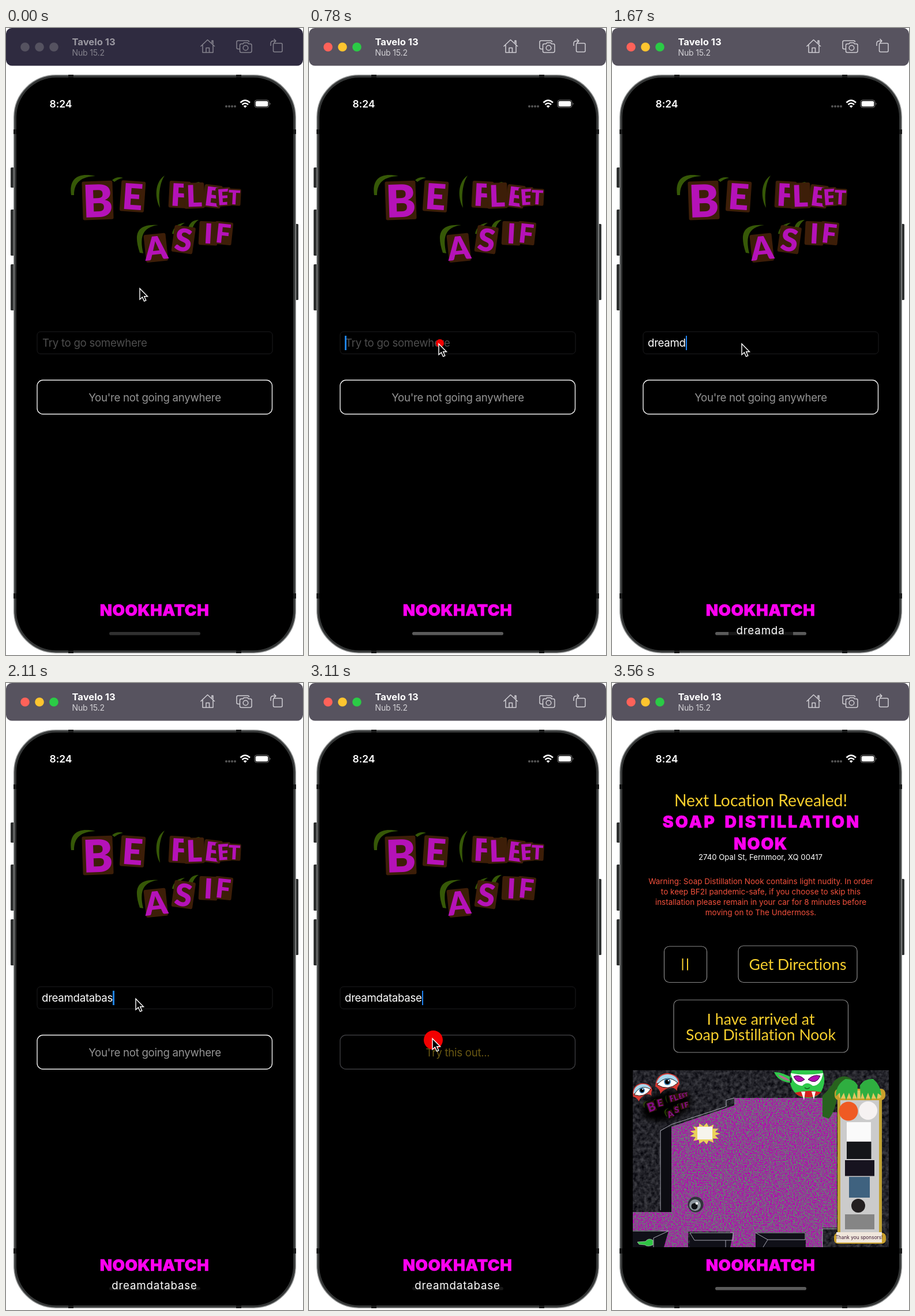
An HTML page for the animation above (4830 ms loop, 515x1088 px).

```html
<!DOCTYPE html>
<html lang="en">
<head>
<meta charset="utf-8">
<title>Phone simulator</title>
<style>
  html, body { margin: 0; width: 100%; height: 100%; overflow: hidden; background: #fff; }
  #stage { position: absolute; left: 0; top: 0; width: 515px; height: 1088px; overflow: hidden; font-family: Inter, sans-serif; }
  svg { position: absolute; left: 0; top: 0; display: block; }
  text { font-family: Inter, sans-serif; font-variant-ligatures: none; }
  .mid { text-anchor: middle; }
  .bar { fill: #2f2b40; }
  .light { fill: #555260; }
  .name { fill: #9a98a1; font-weight: 700; font-size: 16.6px; }
  .sys { fill: #85838d; font-size: 14px; letter-spacing: -.15px; }
  .icons { stroke: #85838d; fill: none; stroke-width: 1.5; stroke-linejoin: round; }
  .home { fill: #303030; }
  .active .bar { fill: #57535f; }
  .active .r { fill: #fe6259; }
  .active .y { fill: #fdc52f; }
  .active .g { fill: #2bcb46; }
  .active .name { fill: #fff; }
  .active .sys { fill: #d3d2d6; }
  .active .icons { stroke: #d0ced4; }
  .active .home { fill: #5a5a5a; }
  .deco { font-weight: 900; fill: #ff00f0; stroke: #ff00f0; stroke-width: .5; text-anchor: middle; }
  .gold { font-family: Lato, sans-serif; font-size: 26.6px; fill: #f7cf2d; text-anchor: middle; }
  .warn { font-size: 13.5px; fill: #f2503c; text-anchor: middle; }
  .box { fill: none; stroke: #8a8a8a; stroke-width: 1.2; }
  .ui, #field, #hint { font-size: 18.7px; letter-spacing: -.3px; }
  .tile { fill: #3d1e08; }
  .letter { font-family: Lato, sans-serif; font-weight: 900; fill: #b512b8; text-anchor: middle; }
  .arc { fill: #365807; }
  #hint, #field { position: absolute; left: 62px; top: 527px; height: 39px; line-height: 39px; white-space: pre; }
  #hint { left: 63px; color: #4d4d4d; }
  #field { color: #fff; display: flex; align-items: center; }
  #caret { width: 2.5px; height: 25px; background: #1f82f0; }
  #keys { position: absolute; left: 257.5px; top: 1031px; line-height: 30px; padding: 0 14px; transform: translateX(-50%);
    border-radius: 6px; background: rgba(0,0,0,.75); color: #fff; font-size: 18.7px; letter-spacing: .85px; white-space: pre; }
</style>
</head>
<body>
<div id="stage">
<svg id="scene" width="515" height="1088" viewBox="0 0 515 1088">
  <defs>
    <filter id="speckle" x="0" y="0" width="1" height="1" color-interpolation-filters="sRGB">
      <feTurbulence type="fractalNoise" baseFrequency=".4 .8" numOctaves="3" seed="4"/>
      <feColorMatrix values="0 0 0 0 .72  0 0 0 0 0  0 0 0 0 .7  40 0 0 0 -20.4" result="spots"/>
      <feComposite in="spots" in2="SourceGraphic" operator="in" result="cut"/>
      <feMerge><feMergeNode in="SourceGraphic"/><feMergeNode in="cut"/></feMerge>
    </filter>
    <filter id="rock" x="0" y="0" width="1" height="1" color-interpolation-filters="sRGB">
      <feTurbulence type="fractalNoise" baseFrequency=".16" numOctaves="5" seed="9"/>
      <feColorMatrix values=".34 0 0 0 -.03  .34 0 0 0 -.03  .34 0 0 0 -.005  0 0 0 0 1"/>
    </filter>
    <filter id="soft" x="-.3" y="-.3" width="1.600" height="1.600"><feGaussianBlur stdDeviation="5"/></filter>
    <clipPath id="mapClip"><rect x="36" y="672" width="444" height="307"/></clipPath>
    <g id="title">
      <path class="arc" d="M113 290C109 262 124 250 155 257C130 258 118 268 118 290zM275 256C257 268 258 296 267 312C264 292 266 270 275 256zM232 390C222 360 224 339 264 342C237 345 231 362 238 391zM184 264Q192 257 203 260Q194 262 188 267zM288 357Q291 340 310 338Q299 344 294 358zM316 347Q320 333 334 333Q326 338 323 349zM328 270Q334 264 340 271Q334 270 332 276z"/>
    </g>
  </defs>

  <!-- window bar -->
  <rect class="bar" width="515" height="65.5" rx="10"/>
  <circle class="light r" cx="33" cy="33" r="7.8"/>
  <circle class="light y" cx="58" cy="33" r="7.8"/>
  <circle class="light g" cx="83" cy="33" r="7.8"/>
  <text class="name" x="114.5" y="30">Tavelo 13</text>
  <text class="sys" x="114.5" y="48">Nub 15.2</text>
  <g class="icons">
    <path d="M337.5 32L349.500 20.500L362 32M341 29.500V42.500H359V29.500M357 26V22H359V28M347 42V34.500H352.500V42"/>
    <path d="M405 36.500H402.500Q400 36.500 400 34V24.500Q400 22 402.500 22H419Q421.500 22 421.500 24.500"/>
    <path d="M408 27.500H411L412.500 25.500H419L420.500 27.500H423.500Q426 27.500 426 30V39.500Q426 42.500 423.500 42.500H408Q405.500 42.500 405.500 40V30Q405.500 27.500 408 27.500z"/>
    <circle cx="415.500" cy="34.500" r="4.300"/>
    <rect x="463.500" y="26.500" width="15.500" height="15" rx="2"/>
    <path d="M459 31V27Q459 22.500 463.500 22.500H467M464.500 19L468 22.500L464.500 26"/>
  </g>

  <!-- phone body -->
  <g fill="#2e3030">
    <rect x="8" y="242" width="8" height="35" rx="1.500"/>
    <rect x="8" y="315" width="8" height="80" rx="1.500"/>
    <rect x="8" y="410" width="8" height="80" rx="1.500"/>
    <rect x="500" y="340" width="7" height="132" rx="1.500"/>
  </g>
  <rect x="13.800" y="81.800" width="488.400" height="1002.400" rx="73" fill="#343636" stroke="#8c8e8e" stroke-width="1.500"/>
  <g fill="#171818">
    <rect x="108" y="81" width="9" height="6"/><rect x="399" y="81" width="9" height="6"/>
    <rect x="108" y="1079" width="9" height="6"/><rect x="399" y="1079" width="9" height="6"/>
    <rect x="13" y="176" width="6" height="8"/><rect x="497" y="176" width="6" height="8"/>
    <rect x="13" y="981" width="6" height="9"/><rect x="497" y="981" width="6" height="9"/>
  </g>
  <rect x="18" y="86" width="480" height="994" rx="69"/>

  <!-- status line -->
  <text x="95" y="138" class="mid" font-size="17.500" font-weight="600" fill="#fff">8:24</text>
  <g fill="#555"><circle cx="382" cy="136" r="2"/><circle cx="387" cy="136" r="2"/><circle cx="392" cy="136" r="2"/><circle cx="397" cy="136" r="2"/></g>
  <g fill="none" stroke="#fff" stroke-width="2.600"><path d="M406.500 129.500Q414.500 121.500 423 129.500M409.500 133Q414.500 128 420 133"/></g>
  <path d="M414.700 138.500L411.700 135.500Q414.700 133 417.700 135.500z" fill="#fff"/>
  <rect x="431" y="125" width="25" height="13" rx="4" fill="none" stroke="#777"/>
  <rect x="432.700" y="126.700" width="21.600" height="9.600" rx="2.500" fill="#fff"/>
  <path d="M457.500 129.500Q460 131.500 457.500 133.500z" fill="#777"/>

  <!-- search page -->
  <g id="search">
    <use href="#title"/>
    <rect x="54" y="527" width="408" height="38.500" rx="6" fill="none" stroke="#1c1c1e"/>
    <g id="button">
      <rect id="frame" x="54" y="611" width="407.500" height="59" rx="10" fill="none" stroke-width="1.400"/>
      <text id="label" class="ui mid" x="258" y="647.500"></text>
    </g>
  </g>

  <!-- location page -->
  <g id="place">
    <text class="gold" x="258" y="214" style="font-size:28.300px">Next Location Revealed!</text>
    <text class="deco" x="259.500" y="251" font-size="28.500" letter-spacing="3" word-spacing="6">SOAP DISTILLATION</text>
    <text class="deco" x="258" y="289" font-size="28.500" letter-spacing="1.500">NOOK</text>
    <text class="mid" x="257.500" y="307" font-size="13.200" fill="#fff">2740 Opal St, Fernmoor, XQ 00417</text>
    <text class="warn" x="258" y="349">Warning: Soap Distillation Nook contains light nudity. In order</text>
    <text class="warn" x="258" y="367">to keep BF2I pandemic-safe, if you choose to skip this</text>
    <text class="warn" x="258" y="385">installation please remain in your car for 8 minutes before</text>
    <text class="warn" x="258" y="403">moving on to The Undermoss.</text>
    <rect class="box" x="90.500" y="457" width="74" height="62.500" rx="9"/>
    <path d="M122.500 478V498.500M131 478V498.500" stroke="#f7cf2d" stroke-width="2"/>
    <rect class="box" x="219" y="456" width="206" height="63.500" rx="9"/>
    <text class="gold" x="322" y="498">Get Directions</text>
    <rect class="box" x="107" y="550" width="302.500" height="91" rx="9"/>
    <text class="gold" x="258" y="592.500">I have arrived at</text>
    <text class="gold" x="258" y="619.500">Soap Distillation Nook</text>

    <g clip-path="url(#mapClip)">
      <rect x="36" y="672" width="444" height="307" filter="url(#rock)"/>
      <path d="M84 777L103 769V918H84z" fill="#0c0c12"/>
      <path filter="url(#speckle)" fill="#70707c" d="M103 770L212 733V720H365V745H390V945H365V979H336V953H249V979H205V952H132V979H84V950H36V918H103z"/>
      <path d="M135 979V954H210L205 979zM249 979V954H335V979zM36 979V951H98L90 979z" fill="#101018"/>
      <path d="M84 915V777L103 766L198 735V724L212 720M72 979V963L98 951H36M135 954H210V967H143L135 954M197 967V979M249 954H335V966H270L249 954M270 966L262 979M365 979V947H390" fill="none" stroke="#b8b8c4" stroke-width=".9"/>

      <ellipse cx="94" cy="734" rx="44" ry="25" transform="rotate(-15 94 734)" filter="url(#soft)"/>
      <use href="#title" transform="translate(96 735) rotate(-18) scale(.27) translate(-257 -330)" opacity=".7"/>
      <g id="eye">
        <path d="M75 700Q76 678 97 677Q117 680 117 696Q112 702 113 708Q108 700 98 703Q88 706 84 713Q83 704 75 700z" fill="#d93a34"/>
        <path d="M77 694Q82 679 97 679Q112 680 115 693z" fill="#a9d8ee"/>
        <path d="M78 697Q96 677 114 694Q98 709 78 697z" fill="#fff" stroke="#111"/>
        <circle cx="96" cy="692" r="6" fill="#3f86b5"/><circle cx="96" cy="692" r="4"/><circle cx="98" cy="690" r="1.300" fill="#fff"/>
      </g>
      <use href="#eye" transform="translate(52 707) rotate(-14) scale(.83) translate(-96 -692)"/>

      <path d="M365 716Q376 706 386 690Q402 676 416 688Q404 700 391 712Q388 742 376 756L365 752z" fill="#28621e"/>
      <path d="M312 672Q304 688 313 705Q322 720 340 720Q360 720 366 702Q371 688 365 672zM311 694Q288 692 281 675Q299 676 312 686z" fill="#2fc94a"/>
      <path d="M287 679Q300 682 310 691Q294 689 287 679z" fill="#b36a8f"/>
      <path d="M310 677Q334 682 366 677Q362 699 348 699Q338 690 330 699Q314 698 310 677z" fill="#fff"/>
      <path d="M315 683Q324 678 334 688Q322 698 315 683zM340 688Q350 678 361 682Q354 698 340 688z" fill="#b20fae" stroke="#300838"/>
      <path d="M334 702Q338 706 343 702" fill="none" stroke="#14581e" stroke-width="1.500"/>
      <path d="M317 711Q340 705 363 710Q354 719 340 719Q324 719 317 711z" fill="#d3221e"/>
      <path d="M328 709H335L333 724zM346 709H353L350 723z" fill="#fff"/>

      <rect x="391" y="720" width="77" height="240" fill="#c2a333"/>
      <rect x="396" y="720" width="67" height="240" fill="#cbcbcb"/>
      <rect x="386" y="704" width="88" height="20" rx="8" fill="#c9a02c"/>
      <rect x="393" y="707" width="74" height="14" rx="5" fill="#e3c660"/>
      <path d="M388 717Q388 697 405 687Q420 687 426 698L425 722L420 710L416 724L411 711L406 724L402 711L396 722L395 711zM430 698Q438 686 453 687Q466 698 467 716L461 712L459 723L453 711L449 724L444 711L439 724L434 711L431 722z" fill="#2fae40"/>

      <circle cx="410" cy="743" r="16.500" fill="#ef5a24"/>
      <circle cx="444" cy="742" r="16" fill="#f6f2f2"/>
      <rect x="407" y="762" width="42" height="33" fill="#fafafa"/>
      <rect x="407" y="796" width="42.500" height="30" fill="#141619"/>
      <rect x="404" y="828" width="51" height="27.500" fill="#17131f"/>
      <rect x="411" y="857" width="36" height="36" fill="#3f627f"/>
      <circle cx="427" cy="907" r="12" fill="#231f20"/>
      <rect x="404" y="922" width="51" height="26" fill="#858585"/>

      <rect x="385" y="954" width="90" height="19" rx="7" fill="#c9a02c"/>
      <rect x="389" y="953" width="79" height="18" fill="#f0e7dc"/>
      <text class="mid" x="428.500" y="965" font-size="8.300" fill="#3a1630">Thank you sponsors!</text>

      <path id="burst" fill="#ead25a"/>
      <rect x="148" y="770" width="26" height="22" fill="#f6f4ec"/>
      <circle cx="145" cy="905" r="13.500" fill="#30343a"/><circle cx="144" cy="906" r="10" fill="#8d979e"/>
      <circle cx="143" cy="908" r="5.500" fill="#101216"/><circle cx="147" cy="903" r="2.200" fill="#fff"/>
      <path d="M44 970L58 969Q64 962 71 967V975Q62 979 57 975L47 974z" fill="#2fc344" stroke="#d8e8d8" stroke-width=".6"/>
    </g>
  </g>

  <text class="deco" x="257.500" y="1020" font-size="27.800" letter-spacing=".4">NOOKHATCH</text>
  <rect class="home" x="179" y="1048" width="158" height="5.600" rx="2.800"/>
</svg>
<div id="hint">Try to go somewhere</div>
<div id="field"><span id="typed"></span><i id="caret"></i></div>
<div id="keys"></div>
<svg width="515" height="1088" viewBox="0 0 515 1088">
  <circle id="tap" fill="#f20000"/>
  <path id="cursor" d="M0 0V19L4.400 15L7.600 22L10.800 20.600L7.700 13.700H13.500z" stroke="#fff" stroke-width="1.400"/>
</svg>
</div>
<script>
const $ = id => document.getElementById(id);
const LOOP = 4830, WORD = 'dreamdatabase';

// letter, centre, baseline, size, tilt
const letters = [
  ['B', 160, 328, 78, -2], ['E', 218, 315, 62, 4],
  ['F', 300, 309, 54, 3], ['L', 327, 310, 52, -2], ['E', 356, 309, 46, 7], ['E', 378, 307, 38, -4], ['T', 395, 306, 34, 3],
  ['A', 262, 402, 56, -6], ['S', 305, 387, 54, 8], ['I', 350, 374, 48, 3], ['F', 375, 373, 46, 6]
];
$('title').innerHTML += letters.map(([c, x, y, s, r]) =>
  `<g transform="translate(${x} ${y}) rotate(${r})">
    <rect class="tile" x="${-.34 * s}" y="${-.8 * s}" width="${.68 * s}" height="${.86 * s}" rx="3"/>
    <text class="letter" font-size="${s}">${c}</text></g>`).join('');

const spikes = Array.from({ length: 26 }, (_, i) => {
  const a = i * Math.PI / 13, r = i % 2 ? .68 : 1;
  return `${161 + 27 * r * Math.cos(a)} ${782 + 19 * r * Math.sin(a)}`;
});
$('burst').setAttribute('d', `M${spikes.join('L')}z`);

// first step, value: the last entry reached applies
const at = (track, k) => track.reduce((v, e) => e[0] <= k ? e[1] : v, track[0][1]);

const pointer = [[0, [232, 452]], [2, [232, 456]], [3, [230, 481]], [4, [228, 519]], [5, [226, 542]], [6, [225, 548]],
  [23, [213, 560]], [24, [211, 580]], [25, [212, 599]], [26, [214, 612]], [27, [214, 617]], [29, [27, 628]], [30, null]];
const tap = [[0, 0], [6, 16], [7, 7], [8, 0], [27, 16.5], [29, 8], [30, 0]];
const typed = [[0, 0], [11, 1], [12, 2], [13, 3], [14, 5], [15, 6], [16, 7], [17, 8], [18, 10], [19, 12], [20, 13]];
const keys = [[0, 0], [10, 1], [11, 2], [12, 3], [13, 4], [14, 6], [15, 7], [16, 8], [17, 10], [18, 11], [19, 13]];
const keysFade = [[0, 1], [30, .8], [31, .4], [32, 0]];
const caret = [[0, 0], [7, 1], [23, .45], [24, 0], [26, .5], [27, 1]];
const press = [[0, 1], [27, .75], [28, .42]];

// nine steps a second, on whole hundredths
const start = k => Math.round(k * 100 / 9) * 10;
function stepAt(t) {
  let k = Math.floor(t * 9 / 1000) + 1;
  while (start(k) > t) k--;
  return Math.min(k, 32);
}

const show = (id, on) => { $(id).style.visibility = on ? 'visible' : 'hidden'; };

function draw(k) {
  const arrived = k >= 29, ready = k >= 20, n = at(typed, k), m = at(keys, k), p = at(pointer, k);
  $('scene').classList.toggle('active', k >= 6);
  show('search', !arrived);
  show('place', arrived);
  show('field', !arrived);
  show('hint', !arrived && !n);
  $('typed').textContent = WORD.slice(0, n);
  $('caret').style.opacity = at(caret, k);
  $('label').textContent = ready ? 'Try this out...' : "You're not going anywhere";
  $('label').style.fill = ready ? '#f7cf2d' : '#949494';
  $('frame').style.stroke = ready ? '#8c8c94' : '#f2f2f2';
  $('button').style.opacity = at(press, k);
  show('keys', m);
  $('keys').textContent = WORD.slice(0, m);
  $('keys').style.opacity = at(keysFade, k);
  const [cx, cy] = k < 20 ? [227, 547] : [215.5, 619.5];
  $('tap').setAttribute('cx', cx);
  $('tap').setAttribute('cy', cy);
  $('tap').setAttribute('r', at(tap, k));
  show('cursor', p);
  if (p) $('cursor').setAttribute('transform', `translate(${p})`);
}

let last = -1;
const zero = performance.now();
function tick() {
  const k = stepAt((performance.now() - zero) % LOOP);
  if (k !== last) draw(last = k);
  requestAnimationFrame(tick);
}
tick();
</script>
</body>
</html>
```
